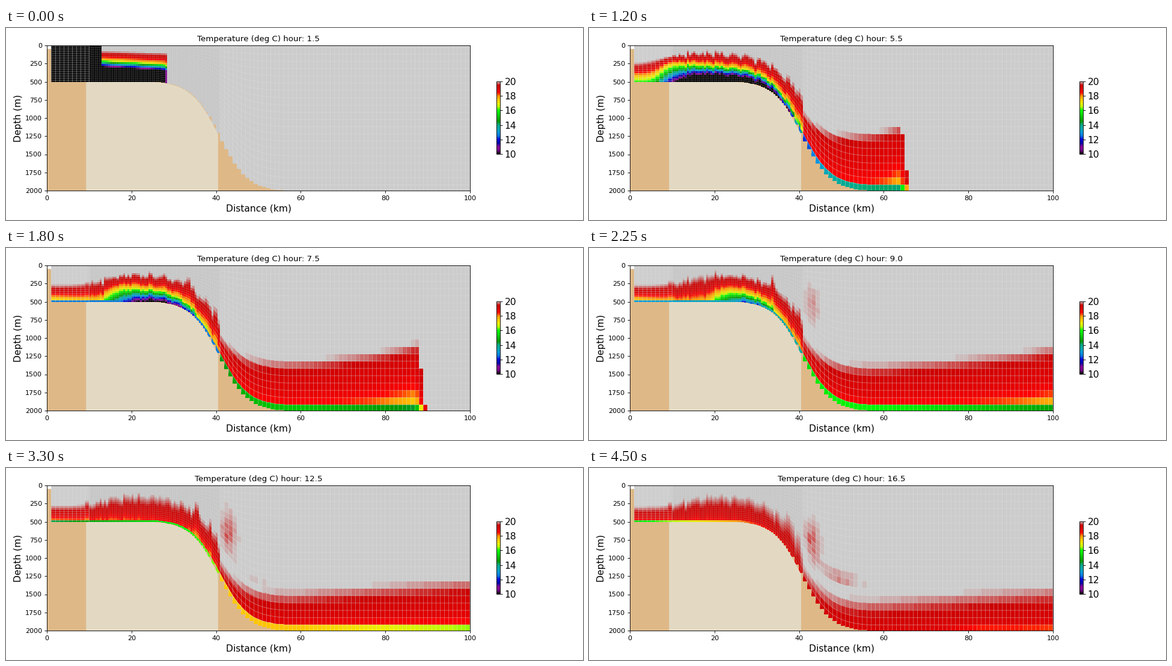
These frames come from a looping animation (960 by 320 pixels, 4650 ms). A matplotlib script:

```python
import numpy as np
import matplotlib.pyplot as plt
from matplotlib.animation import FuncAnimation
from matplotlib.collections import LineCollection

W, H, DPI = 960, 320, 80
FRAMES, STEP_MS = 31, 150
SHELF_END = 40.9

plt.rcParams["font.family"] = "DejaVu Sans"
rng = np.random.default_rng(4)


def seabed(x):
    return np.clip(1250 + 765 * np.tanh((x - 40.8) / 6.7), 500, 2000)


def sigmoid(u):
    return 0.5 + 0.5 * np.tanh(u / 2)


def gauss(u, width):
    return np.exp(-(u / width) ** 2)


def ramp(s, lo, hi, most=1):
    return np.clip((s - lo) / np.maximum(hi - lo, 0.02), 0, most)


# Terrain-following mesh: columns in km, layers as fractions of depth
edges = np.r_[np.arange(1, 10), np.linspace(10, SHELF_END, 63),
              np.arange(41.9, 99.95), 100]
layers = np.r_[0, np.arange(0.01, 0.97, 0.05), 1]
xc = (edges[1:] + edges[:-1]) / 2
sc = ((layers[1:] + layers[:-1]) / 2)[:, None]
on_shelf = xc < SHELF_END
grain = rng.normal(0, 0.6, xc.size)
patch = rng.uniform(0.5, 1, (sc.size, xc.size))


def shelf_water(t):
    """Layered cold water whose dense core drifts down the slope."""
    u = t - 3.5
    core = 3.6 * u                           # left edge of the core, km
    slope = sigmoid((xc - 32) / 3) * np.clip(u + 2, 0, 1)
    behind = sigmoid((core - xc) / 1.2)
    thin = sigmoid((min(core, 13) - xc) / 3)

    rough = 0.055 * np.clip((t - 1.5) / 4, 0, 1) * (xc > 9)
    rough = rough * (0.6 * np.sin(1.9 * xc - 3 * t)
                     + 0.5 * np.sin(3.7 * xc + 2 * t) + grain)
    spike = 0.2 * np.clip(t - 6, 0, 1) * gauss(xc - 30 - 0.44 * t, 0.7)

    top = 0.12 + 0.003 * xc + 0.005 * u + 0.3 * slope + 0.38 * thin
    top = top + rough - spike
    mid = 0.35 + 0.007 * xc + 0.025 * u + 0.25 * slope + 0.45 * behind
    mid = np.maximum(mid + 0.4 * rough, top + 0.1)
    red = top + 0.55 * (mid - top)
    gap = 0.18 + 0.03 * max(u, 0) + 0.4 * sigmoid((core + 4 - xc) / 2)
    cold = mid + gap * (1 - 0.6 * slope)

    temp = (20 - ramp(sc, top, red) - 1.5 * ramp(sc, red, mid)
            - 7 * ramp(sc, mid, cold, 1.08))
    v = t - 7.5
    film = 12.5 + 0.33 * max(v, 0) + 1.8 * max(-v, 0)
    film = np.minimum(film + 0.011 * max(v, 0) * xc, 19)
    temp[-1] = np.minimum(temp[-1], film)
    return temp


def basin_water(t, nose):
    """Gravity current: a cool head, a long red body and a cold film."""
    age = t - 5.5
    far = np.maximum(xc - 60, 0)
    near = np.exp(-np.maximum(xc - 42, 0) / 5)
    behind = np.maximum(nose - 1 - xc, 0)

    top = 0.62 + 0.013 * age + 0.1 * near - 0.002 * far
    top = top - 0.09 * np.exp(-behind / 9) - 0.4 * np.clip(4.5 - t, 0, 1)
    red = top + 0.13 + 0.01 * age
    chill = 0.5 + 1.6 * np.exp(-behind / (4 + 3 * max(age, 0)))
    temp = 20 - ramp(sc, top, red) - chill * ramp(sc, red, 0.96) ** 2
    film = (14.2 + 0.48 * age - 0.03 * far
            - 2 * near * np.exp(-max(age, 0) / 2))
    temp[-1] = np.minimum(temp[-1], film)

    # Wisps shed above the slope
    shed = gauss(xc - 44 - 1.2 * np.sin(1.7 * (t - 9.6)), 1.7)
    shed = shed * gauss(sc - 0.4 - 0.02 * (t - 10.5), 0.17)
    tail = gauss(xc - 49, 5) * gauss(sc - 0.67, 0.05)
    wisp = np.maximum(shed * np.clip((t - 8) / 2, 0, 1),
                      tail * np.clip((t - 11) / 9, 0, 1))
    return temp - 0.42 * patch * wisp


def temperature(t):
    u = t - 3.5
    nose = 43 + 11.75 * max(u, 0) + 7.2 * min(u, 0)
    temp = np.where(on_shelf, shelf_water(t), basin_water(t, nose))

    # Leading edge of the current
    d = (nose - xc) / np.clip(0.15 + 0.22 * (t - 1.5), 0, 1)
    temp = 20 - (20 - temp) * np.clip(d / 3, 0, 1)
    temp[(d < 0) | ((d < 2.2) & (sc < 1.08 - 0.22 * d))] = 20

    # Cold reservoir draining from the left
    back = 13 - 5.5 * (t - 1.5)
    rim = (xc < back + 1) & (xc < 10)
    temp[:, rim] = np.minimum(temp[:, rim], 12.3)
    temp[:, xc < back] = 10
    return temp


fig = plt.figure(figsize=(W / DPI, H / DPI), dpi=DPI, facecolor="white")
ax = fig.add_axes([68 / W, 49 / H, 704 / W, 242 / H])
ax.set(xlim=(0, 100), ylim=(2000, 0),
       xticks=range(0, 101, 20), yticks=range(0, 2001, 250))
ax.set_xlabel("Distance (km)", fontsize=14)
ax.set_ylabel("Depth (m)", fontsize=14)
title = ax.set_title("", fontsize=12)

X = np.tile(edges, (layers.size, 1))
Y = layers[:, None] * seabed(edges)
Y[-1] = seabed(edges + 0.55)
mesh = ax.pcolormesh(X, Y, temperature(1.5), cmap="nipy_spectral",
                     vmin=10, vmax=20, zorder=1)


def grid(lo, hi, color, width):
    e = edges[(edges >= lo) & (edges <= hi)]
    lines = [[(x, 0), (x, seabed(x))] for x in e]
    lines += [np.c_[e, s * seabed(e)] for s in layers[1:-1]]
    ax.add_collection(LineCollection(lines, colors=[color], linewidths=width,
                                     zorder=1.5), autolim=False)


grid(1, 10, (.87, .87, .87, .7), 0.5)
grid(10, SHELF_END, (.72, .72, .72, .55), 0.4)
grid(SHELF_END, 100, (.87, .87, .87, .7), 0.5)

# Stepped sea floor with the smooth pale section in front
steps = np.r_[edges[edges < 37.8], np.arange(37.9, 100), 100]
floor = seabed((steps[1:] + steps[:-1]) / 2)
fx = np.r_[0, 1, np.repeat(steps, 2)[1:-1], 100, 0]
fy = np.r_[50, 50, np.repeat(floor, 2), 2100, 2100]
ax.fill(fx, fy, color="burlywood", lw=0, zorder=2)
bx = np.linspace(9.2, 40.4, 120)
ax.fill_between(bx, seabed(bx + 0.15), 2000, color="#e3d9c3", lw=0, zorder=2.1)

cax = fig.add_axes([816 / W, 110 / H, 6 / W, 121 / H])
bar = fig.colorbar(mesh, cax=cax, ticks=range(10, 21, 2))
bar.ax.tick_params(labelsize=14)


def update(i):
    hour = 1.5 + 0.5 * i
    mesh.set_array(temperature(hour))
    title.set_text(f"Temperature (deg C) hour: {hour:.1f}")
    return mesh, title


anim = FuncAnimation(fig, update, frames=FRAMES, interval=STEP_MS,
                     repeat=True, repeat_delay=0)
plt.show()
```
